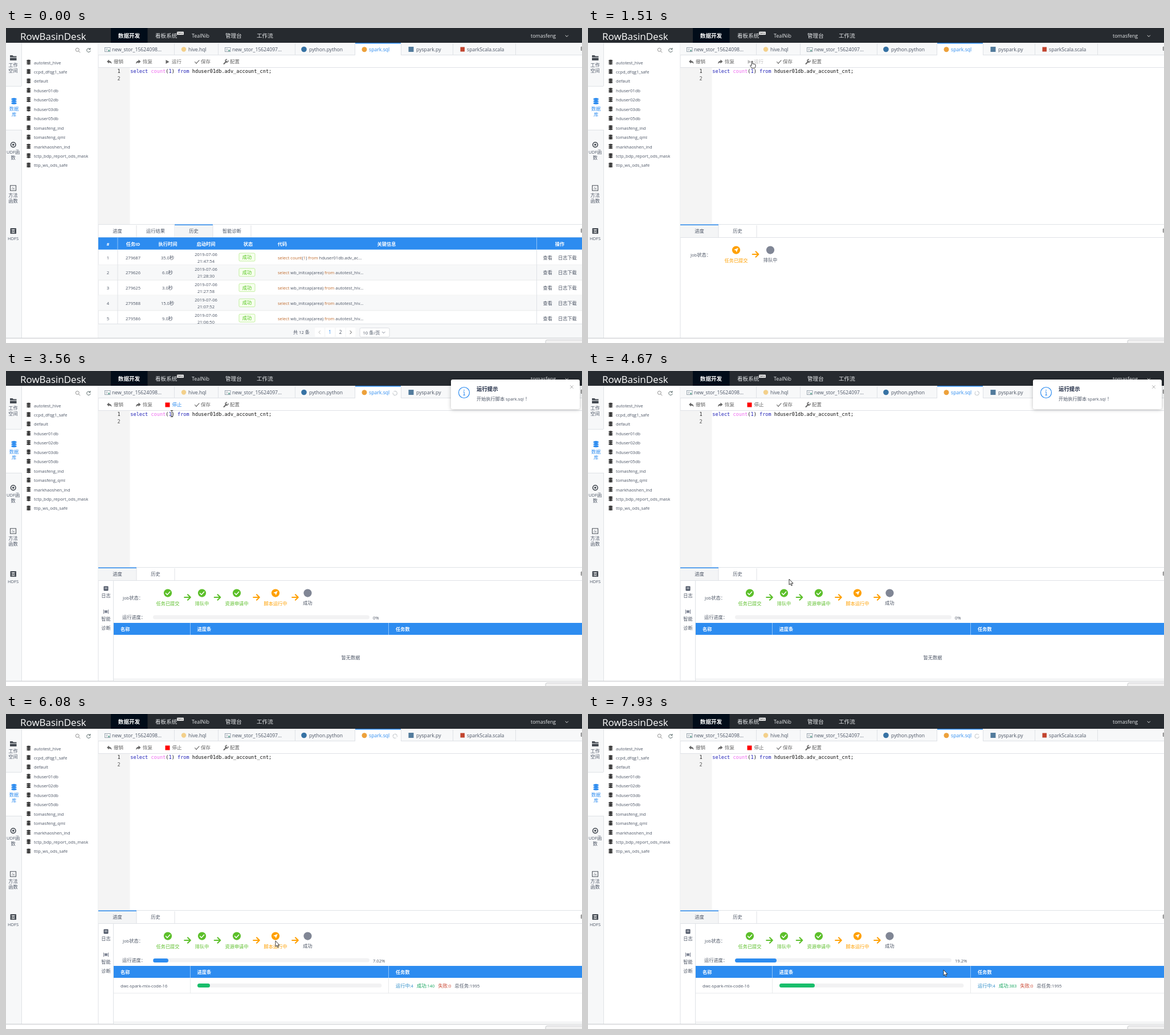
These frames come from a looping animation (1011 px wide and 554 px high, 8000 ms). An HTML page:

```html
<!DOCTYPE html>
<html lang="zh-CN">
<head>
<meta charset="utf-8">
<title>SQL 任务运行</title>
<style>
html, body { margin: 0; width: 100%; height: 100%; overflow: hidden; background: #fff; }
#stage { position: relative; width: 1011px; height: 554px; overflow: hidden; }
svg { position: absolute; left: 0; top: 0; }
text { font-family: "Open Sans", "Noto Sans CJK SC", "Noto Sans CJK", sans-serif; white-space: pre; }
.mono { font-family: "DejaVu Sans Mono", monospace; }
.mid { text-anchor: middle; }
.bold { font-weight: 700; }
.line { fill: none; stroke-linecap: round; stroke-linejoin: round; }

.fill { position: absolute; height: 7px; border-radius: 4px; overflow: hidden; animation: load 8s linear infinite; }
.fill::after { content: ""; position: absolute; left: 0; top: 0; height: 100%; background: #fff; animation: shimmer 2s ease-in-out infinite; }
#total { left: 258px; top: 429.5px; --w: 380px; background: #2d8cf0; }
#stageBar { left: 335.5px; top: 474px; --w: 324px; background: #19be6b; }
@keyframes load {
  0%, 66.875% { width: 0; }
  69.375%, 84.875% { width: calc(var(--w) * .0702); }
  87.375%, 94.125% { width: calc(var(--w) * .1248); }
  96.625%, 100% { width: calc(var(--w) * .192); }
}
@keyframes shimmer { from { width: 0; opacity: .3; } to { width: 100%; opacity: 0; } }

#spin { transform-origin: 682.8px 39px; animation: spin 1s linear infinite; }
@keyframes spin { to { transform: rotate(360deg); } }

#notice { animation: notice 8s linear infinite; }
@keyframes notice {
  0%, 31.5% { transform: translateX(235px); opacity: 0; animation-timing-function: ease-in-out; }
  35.25%, 68.75% { transform: none; opacity: 1; animation-timing-function: ease-in-out; }
  72.5%, 100% { transform: translateX(235px); opacity: 0; }
}

#cursor { animation: cursor 8s ease-in-out infinite; }
@keyframes cursor {
  0%, .875% { transform: translate(516px, 306px); }
  8.75%, 40.5% { transform: translate(288px, 58px); }
  44.5% { transform: translate(291px, 75px); }
  50.5% { transform: translate(300px, 372px); }
  53.75% { transform: translate(233px, 388px); }
  58.375% { transform: translate(353px, 366px); }
  76%, 82.5% { transform: translate(473px, 399px); }
  99.125%, 100% { transform: translate(624px, 450px); }
}
</style>
</head>
<body>
<div id="stage">
  <svg id="page" width="1011" height="554"></svg>
  <div id="total" class="fill"></div>
  <div id="stageBar" class="fill"></div>
  <svg id="overlay" width="1011" height="554"></svg>
</div>
<script>
const LOOP = 8000;
const BLUE = '#2d8cf0', GREEN = '#5cbf2a', ORANGE = '#ffa000', GREY = '#808695', INK = '#4c5565', EDGE = '#dfe2e6', PALE = '#f7f8f9';
let css = '', windows = 0;

const rect = (x, y, w, h, fill, more = '') => `<rect x="${x}" y="${y}" width="${w}" height="${h}" fill="${fill}" ${more}/>`;
const disc = (x, y, r, fill) => `<circle cx="${x}" cy="${y}" r="${r}" fill="${fill}"/>`;
const ring = (x, y, r, c, w = 1) => `<circle cx="${x}" cy="${y}" r="${r}" fill="none" stroke="${c}" stroke-width="${w}"/>`;
const hline = (x, y, w, c = EDGE) => rect(x, y, w, 1, c);
const vline = (x, y, h, c = EDGE) => rect(x, y, 1, h, c);
const line = (d, c, w = 1) => `<path class="line" d="${d}" stroke="${c}" stroke-width="${w}"/>`;
const shape = (d, c) => `<path d="${d}" fill="${c}"/>`;
const at = (x, y, body) => `<g transform="translate(${x} ${y})">${body}</g>`;

// y is the vertical centre; Latin runs are set a little smaller than Chinese ones
function text(x, y, s, fill = INK, size = 8.2, cls = '') {
  const body = s.replace(/[ -\u02ff]+/g, m => `<tspan font-size="${size * .927}">${m}</tspan>`);
  return `<text x="${x}" y="${y + size * .37}" fill="${fill}" font-size="${size}" class="${cls}">${body}</text>`;
}
const mid = (x, y, s, fill, size, cls = '') => text(x, y, s, fill, size, 'mid ' + cls);

function runs(x, y, size, cls, parts) {
  const body = parts.map(([s, c]) => `<tspan fill="${c}">${s}</tspan>`).join('');
  return `<text x="${x}" y="${y}" font-size="${size}" class="${cls}">${body}</text>`;
}

// Shows its content only between two times of the loop
function during(from, to, body) {
  const name = 'win' + ++windows, pc = t => t / LOOP * 100 + '%';
  css += `@keyframes ${name}{0%{opacity:0}${pc(from)}{opacity:1}${pc(to)},100%{opacity:0}}`;
  return `<g style="animation:${name} 8s step-end infinite">${body}</g>`;
}

function database(x, y, c, k = 1) {
  let s = '';
  for (let i = 0; i < 3; i++) {
    const v = -3.2 + i * 2.8;
    s += shape(`M-3.5 ${v}Q0 ${v - 2} 3.5 ${v}V${v + 1.2}Q0 ${v + 2.8} -3.5 ${v + 1.2}Z`, c);
  }
  return `<g transform="translate(${x} ${y}) scale(${k})">${s}</g>`;
}

function header() {
  let s = rect(0, 0, 1011, 26, '#262a2f') + rect(184, 0, 64.5, 26, '#010c19');
  s += text(25, 13.8, 'RowBasinDesk', '#fff', 18.3);
  s += mid(216, 13.3, '数据开发', '#fff', 9.6, 'bold');
  [[262, '看板系统'], [326, 'TealNib'], [385, '管理台'], [440, '工作流'], [921, 'tomasfeng']]
    .forEach(([x, name]) => s += text(x, 13.3, name, '#e4e6e8', 9.6));
  s += rect(300, 6.5, 12, 5.5, '#fff', 'rx="1"') + mid(306, 9.1, 'beta', '#222', 5);
  return s + line('M982 13l2.3 2.3l2.3 -2.3', '#ddd');
}

function rail() {
  const dark = '#444a52';
  let s = rect(0, 26, 27, 519, PALE) + vline(27, 26, 519);
  s += rect(0, 102, 28, 77, '#fff') + hline(0, 102, 27) + hline(0, 179, 27);
  s += shape('M7 48h4.5l1.5 1.5h5.5v2h-11.5zM7 52.5h11.5v4.5h-11.5z', dark);
  s += database(14, 128.5, BLUE, 1.3);
  s += ring(12.7, 205.3, 4.3, dark, 1.6) + disc(12.7, 205.3, 1.8, dark);
  s += rect(7.5, 277, 10, 9, 'none', `stroke="${dark}"`) + mid(12.5, 281.5, '/x', dark, 6.5);
  s += rect(7.5, 352, 10.5, 10, dark, 'rx="1"') + line('M10 354.5h5.5M10 360h5.5', '#fff', .8) + ring(12.7, 357.2, 1.8, '#fff');
  [['工作', 65], ['空间', 75], ['数据', 142, BLUE], ['库', 152.3, BLUE], ['UDF函', 218], ['数', 228], ['方法', 294], ['函数', 304.3], ['HDFS', 370]]
    .forEach(([name, y, c]) => s += mid(c ? 14 : 12.5, y, name, c));
  return s;
}

function databases() {
  let s = vline(161.5, 26, 519);
  s += ring(125.3, 38.3, 3, '#777', .8) + line('M127.5 40.5l2.5 2.5', '#777', .8);
  s += line('M147.8 37.3A3.3 3.3 0 1 0 148.2 40.2M148 35.3v2.3h-2.3', '#566');
  ['autotest_hive', 'ccpd_dfqg1_safe', 'default', 'hduser01db', 'hduser02db', 'hduser03db', 'hduser05db', 'tomasfeng_ind',
    'tomasfeng_qml', 'markhaoshen_ind', 'tctp_bdp_report_ods_mask', 'ttip_ws_ods_safe'].forEach((name, i) => {
    const y = 60.5 + 16.45 * i;
    s += database(39.7, y - .5, '#333') + text(49, y, name);
  });
  return s;
}

const clippedIcon = y => line(`M1009.5 ${y}v5.5M1009.5 ${y}h2M1009.5 ${y + 2.7}h2M1009.5 ${y + 5.5}h2`, '#666');

function fileTabs() {
  let s = rect(162, 26, 849, 21, PALE) + hline(162, 47, 849);
  s += rect(613, 26, 80, 22, '#fff') + rect(613, 26, 80, 1.5, BLUE);
  [295, 372, 507, 612, 693, 784, 894].forEach(x => s += vline(x, 27, 20));
  for (const x of [178, 389]) {
    s += rect(x - 4.5, 34.5, 9.5, 7, '#fff', 'stroke="#8d9aa5" stroke-width=".9"')
      + line(`M${x - 2.5} 37h3M${x - 2.5} 39h2`, '#8d9aa5', .8) + disc(x + 2.5, 39.5, 1.6, '#6cab9c');
  }
  s += disc(312, 37.5, 4.2, '#f3d08b') + disc(523, 37.5, 4.8, '#3672a4') + disc(629, 37.8, 4.5, '#eda13b');
  s += rect(706.5, 33, 9, 9, '#527b9c') + rect(797.5, 33.5, 7.5, 8, '#c2452f');
  [[186, 'new_stor_15624098...'], [320, 'hive.hql'], [397, 'new_stor_15624097...'], [532, 'python.python'],
    [637, 'spark.sql', BLUE], [720, 'pyspark.py'], [809, 'sparkScala.scala']]
    .forEach(([x, name, c]) => s += text(x, 37.7, name, c, 9.35));
  return s + clippedIcon(33.5)
    + during(1590, LOOP, `<g id="spin">${line('M685.9 41A3.7 3.7 0 1 1 686.4 38', '#aab0b6', .9)}</g>`);
}

function toolbar() {
  const c = '#666';
  const run = fill => shape('M280.5 56l6 3.5l-6 3.5z', fill) + text(291, 59.3, '运行', fill, 8.5);
  const stop = fill => text(291.5, 59.3, '停止', fill, 8.5);
  const back = shape('M-4.5 -.5L-.5 -4V-1.8Q4 -1.5 3.8 3.5Q2.5 1 -.5 1V3z', c);
  let s = hline(162, 69, 849);
  s += at(181.5, 59.5, back) + `<g transform="translate(232 59.5) scale(-1 1)">${back}</g>`;
  s += line('M331.5 59.5l2.5 2.8l5 -5.5', c, 1.1);
  s += line('M382.5 63l4.5 -4.5', c, 2) + line('M390 57.5a2.5 2.5 0 1 1 -2.5 -2.3', c, 1.4);
  [[189, '撤销'], [240, '恢复'], [342, '保存'], [393, '配置']].forEach(([x, name]) => s += text(x, 59.3, name, c, 8.5));
  s += during(0, 610, run(c)) + during(610, 1510, run(BLUE)) + during(1510, 1590, run('#bbb'));
  s += during(1590, LOOP, rect(279.5, 55.5, 8, 8, '#f00'));
  return s + during(1590, 3640, stop(BLUE)) + during(3640, LOOP, stop(c));
}

function editor() {
  const key = '#2424b8', ink = '#111', size = 8.58;
  let s = rect(162, 70, 55.5, 275, '#f4f4f4') + hline(162, 345, 849);
  s += runs(195.5, 79, size, 'mono', [['1', '#222']]) + runs(195.5, 91.5, size, 'mono', [['2', '#555']]);
  return s + runs(218.3, 79, size, 'mono', [['select ', key], ['count', '#ef6cf0'], ['(', ink], ['1', key], [') ', ink],
    ['from', key], [' hduser01db.adv_account_cnt;', ink]]);
}

function panelTabs(names, active) {
  let s = hline(162, 368, 849);
  names.forEach((name, i) => {
    const x = 162 + 67 * i;
    if (i === active) s += rect(x, 346, 67, 22, '#f4f5f6') + rect(x, 345.5, 67, 1.5, BLUE);
    s += vline(x + 66.5, 347, 21) + mid(x + 33.5, 357, name);
  });
  return s + clippedIcon(353.5);
}

function history() {
  const brown = '#bf6a2c';
  let s = panelTabs(['进度', '运行结果', '历史', '智能诊断'], 2);
  const rows = [[279687, '35.0', '21:47:54'], [279626, '6.0', '21:28:30'], [279625, '3.0', '21:27:58'], [279588, '15.0', '21:07:52'], [279586, '9.0', '21:06:50']];
  rows.forEach(([id, secs, clock], i) => {
    const top = 389.7 + 26.8 * i, y = top + 13.8;
    if (i % 2) s += rect(162, top, 849, 26.8, PALE);
    s += hline(162, top + 26.3, 849, '#e8eaec');
    s += mid(179, y, `${i + 1}`) + mid(223, y, `${id}`) + mid(283.5, y, secs + '秒');
    s += mid(351, y - 6, '2019-07-06') + mid(351, y + 6, clock);
    s += rect(409, y - 7.5, 28, 14, '#f6ffed', 'rx="2" stroke="#b7eb8f" stroke-width=".8"') + mid(423, y - .5, '成功', '#52c41a');
    s += runs(477, y + 3, 7.6, '', i
      ? [['select', brown], [' wb_initcap(area) ', INK], ['from', brown], [' autotest_hiv...', INK]]
      : [['select count', brown], ['(', INK], ['1', brown], [') ', INK], ['from', brown], [' hduser01db.adv_ac...', INK]]);
    s += text(942.5, y, '查看') + text(969, y, '日志下载');
  });
  s += vline(195.5, 390, 130) + vline(931, 390, 130) + rect(162, 368.3, 849, 21.4, BLUE);
  s += vline(195.5, 368.3, 21.4, '#8fc3f8') + vline(931, 368.3, 21.4, '#8fc3f8');
  [[179, '#'], [223, '任务ID'], [284, '执行时间'], [351, '启动时间'], [425, '状态'], [485, '代码'], [668, '关键信息'], [972, '操作']]
    .forEach(([x, name]) => s += mid(x, 379.7, name, '#fff', 8.2, 'bold'));
  s += rect(162, 520, 849, 25, PALE) + hline(162, 520, 849);
  s += text(504, 534.5, '共 12 条');
  [542, 560.5, 579, 597].forEach(x => s += rect(x, 527, 16.5, 16, '#fff', 'rx="2"'));
  s += line('M551.5 532.5l-2.5 2.7l2.5 2.7', '#bbb') + line('M604 532.5l2.5 2.7l-2.5 2.7', '#555');
  s += mid(568.5, 535, '1', BLUE, 8.8) + mid(587.2, 535, '2', INK, 8.8);
  s += rect(621, 527.5, 52, 16, '#fff', 'rx="2.5" stroke="#dcdee2"') + text(626.5, 535.5, '10 条/页');
  return s + line('M660.5 534.5l2.3 2.3l2.3 -2.3', GREY);
}

const TICK = line('M-3.5 .2l2.5 2.6l4.6 -5', '#fff', 1.5);
const PLANE = shape('M3.8 -3.8L.8 4L-.5 .6L-4 -.6z', '#fff');
function step(x, name, c, icon = '') {
  const waiting = c === GREY;
  return disc(x, 390.6, 7.1, c) + at(x, 390.6, icon) + mid(x, waiting ? 407.5 : 408.5, name, waiting ? INK : c);
}
const arrow = (x, c) => line(`M${x - 5.3} 398h10M${x + .5} 393.3l4.8 4.7l-4.8 4.7`, c, 2.1);

function submitted() {
  return panelTabs(['进度', '历史'], 0) + text(180, 399.3, 'Job状态：') + step(260, '任务已提交', ORANGE, PLANE)
    + arrow(294, ORANGE) + step(320, '排队中', GREY);
}

function running() {
  let s = panelTabs(['进度', '历史'], 0) + vline(188, 369, 176) + hline(189, 541.5, 822);
  s += rect(171.5, 378.5, 8, 8, INK, 'rx="1"') + line('M173.5 381h4M173.5 383h4', '#fff', .8);
  s += line('M171.5 420v6.5M179.5 420v6.5M174 423.2h3', GREY, 1.2) + rect(173, 421, 5, 4.5, GREY);
  s += mid(175.5, 395, '日志') + mid(175.5, 436, '智能') + mid(175.5, 451.5, '诊断');
  s += text(205, 399.3, 'Job状态：') + text(204, 432.5, '运行进度：');
  s += step(284, '任务已提交', GREEN, TICK) + step(344, '排队中', GREEN, TICK) + step(405, '资源申请中', GREEN, TICK);
  s += step(473, '脚本运行中', ORANGE, PLANE) + step(529.5, '成功', GREY);
  s += arrow(318.5, GREEN) + arrow(371, GREEN) + arrow(439.5, ORANGE) + arrow(507.5, ORANGE);
  s += rect(258, 429.5, 380, 7, '#f2f2f3', 'rx="3.5"') + rect(189, 443, 822, 21, BLUE);
  [323, 671].forEach(x => s += vline(x, 443, 21, '#8fc3f8'));
  [[201, '名称'], [335.5, '进度条'], [684, '任务数']].forEach(([x, name]) => s += text(x, 453.7, name, '#fff', 8.2, 'bold'));
  return s;
}

function progress() {
  const stages = [[5350, 6790, 7.02, 140], [6790, 7530, 12.48, 249], [7530, LOOP, 19.2, 383]];
  let row = hline(189, 490.5, 822, '#e8eaec') + vline(323, 464, 27, '#e8eaec') + vline(671, 464, 27, '#e8eaec');
  row += text(201, 478, 'dwc-spark-mix-code-16') + rect(335.5, 474, 324, 7, '#f2f2f3', 'rx="3.5"');
  row += text(684, 478, '运行中:4', '#2d8cc8') + text(758.5, 478, '失败:0', '#c8402c') + text(787.5, 478, '总任务:1995');
  let s = during(2440, 5350, text(644, 433.5, '0%') + mid(605, 503.5, '暂无数据')) + during(5350, LOOP, row);
  for (const [from, to, percent, done] of stages)
    s += during(from, to, text(644, 433.5, percent + '%') + text(721, 478, '成功:' + done, '#12a35c'));
  return s;
}

function notice() {
  let s = rect(781, 15, 226, 52, '#fff', 'rx="3" style="filter:drop-shadow(0 1px 3px rgba(0,0,0,.25))"');
  s += ring(804, 38, 9.5, BLUE, 1.2);
  s += disc(804, 33.8, .9, BLUE) + line('M803 36.7h1.2v5.5M802.7 42.3h3', BLUE);
  s += text(826, 32, '运行提示', '#17233d', 9.4, 'bold') + text(826, 49, '开始执行脚本 spark.sql ！');
  s += line('M990.5 25.5l5 5M995.5 25.5l-5 5', '#aaa', .9);
  return `<g id="notice">${s}</g>`;
}

function cursor() {
  const skin = d => `<path d="${d}" fill="#fff" stroke="#222" stroke-width=".9" stroke-linejoin="round"/>`;
  const beam = line('M-1.8 -5.5H1.8M0 -5.5V5.5M-1.8 5.5H1.8', '#222', .9);
  const hand = skin('M-.9 .8Q0 -.6 1 .8V5Q2.2 4.2 3 5.5Q4.2 4.8 4.7 6Q6 5.6 6 7V9.5L4.7 12.5H-.5L-3.3 8.3Q-3.2 6.7 -.9 8z');
  const arrowhead = skin('M0 0V10L2.3 8L3.9 11.6L5.5 10.9L4 7.4H7z');
  return `<g id="cursor">${during(70, 610, beam) + during(610, 3420, hand) + during(3420, 3930, beam) + during(3930, LOOP, arrowhead)}</g>`;
}

const footer = rect(0, 544.8, 1011, 1.5, '#d3d5d8')
  + rect(947, 548.5, 70, 10, '#f1f1f1', 'rx="3" stroke="#c9cbce"');

page.innerHTML = header() + rail() + databases() + fileTabs() + toolbar() + editor()
  + during(0, 1510, history()) + during(1510, 2440, submitted()) + during(2440, LOOP, running()) + progress() + footer;
overlay.innerHTML = notice() + cursor();
document.head.appendChild(document.createElement('style')).textContent = css;
</script>
</body>
</html>
```
